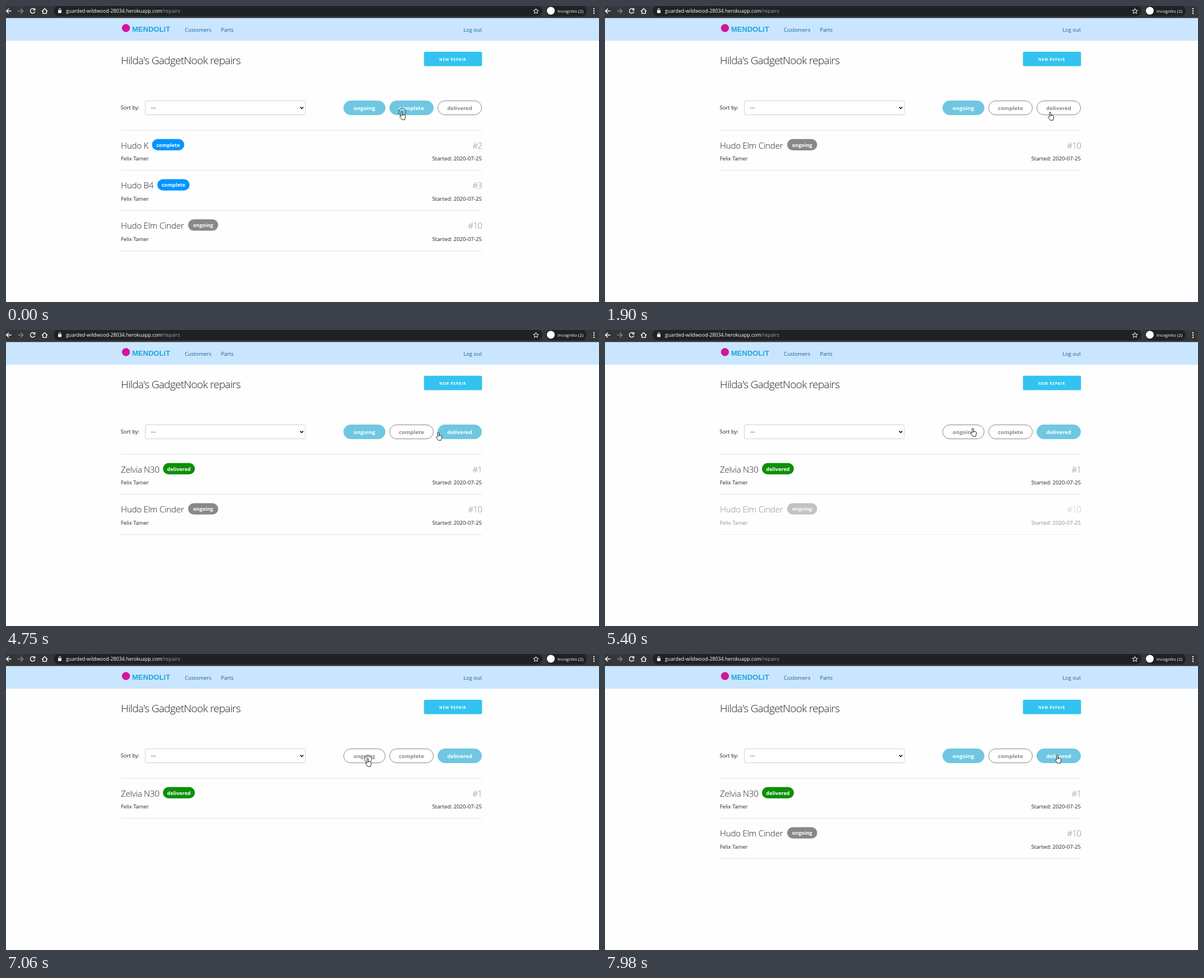
These frames come from a looping animation (1058x529 px, 8000 ms). An HTML page:

```html
<!DOCTYPE html>
<html lang="en">
<head>
<meta charset="utf-8">
<title>Repairs</title>
<style>
html, body { margin: 0; width: 100%; height: 100%; overflow: hidden; background: #fefefe; }
svg { display: block; width: 1058px; height: 529px; font: 9.4px "Open Sans", "Noto Sans", sans-serif; fill: #222; }
.icons { fill: none; stroke: #fff; stroke-width: 1.4; }
.icons .thin { stroke-width: 1; }
.icons .off { stroke: #85878a; }
.link { fill: #1b5e91; }
.name { font-size: 15.3px; font-weight: 300; letter-spacing: -.3px; }
.id { font-size: 15.3px; font-weight: 300; letter-spacing: -.9px; fill: #888; }
.date { font-size: 9.7px; }
.end { text-anchor: end; }
.pill, .badge { font-weight: 700; text-anchor: middle; }
.pill { font-size: 9.6px; }
.badge { font-size: 9px; fill: #fff; }
</style>
</head>
<body>
<svg viewBox="0 0 1058 529">
  <rect width="1058" height="529" fill="#fefefe"/>

  <!-- browser bar -->
  <rect width="1058" height="22" fill="#35363a"/>
  <rect x="85" y="-1" width="872" height="19.5" rx="9.7" fill="#202124"/>
  <rect x="964" y="-1" width="72" height="19.5" rx="9.7" fill="#202124"/>
  <g class="icons">
    <path d="M9.5 9H.8M5 4.8L.8 9L5 13.2"/>
    <path class="off" d="M21.5 9H30.5M26.3 4.8L30.5 9L26.3 13.2"/>
    <path d="M51 6.2A4.2 4.2 0 1 0 51.6 10M51.6 4V7.4H48.2"/>
    <path d="M64 9.6L69 4.8L74 9.6M65.8 8.5V13.4H72.2V8.5"/>
    <path class="thin" d="M94.2 8V6.4a1.8 1.8 0 0 1 3.6 0V8"/>
    <path class="thin" d="M945.5 4.4l1.3 3.1 3.4.3-2.6 2.2.8 3.3-2.9-1.8-2.9 1.8.8-3.3-2.6-2.2 3.4-.3z"/>
  </g>
  <g fill="#fff">
    <rect x="93" y="7.5" width="6" height="5" rx=".6"/>
    <circle cx="972" cy="8.5" r="7"/>
    <circle cx="1049" cy="5" r="1.2"/>
    <circle cx="1049" cy="9" r="1.2"/>
    <circle cx="1049" cy="13" r="1.2"/>
    <text x="107" y="12" font-size="8.8" font-weight="500">guarded-wildwood-28034.herokuapp.com<tspan fill="#9aa0a6" font-weight="400">/repairs</tspan></text>
    <text x="984" y="11.5" font-size="8" font-weight="500">Incognito (2)</text>
  </g>

  <!-- page header -->
  <rect y="21.5" width="1058" height="40.5" fill="#c9e6fe"/>
  <circle cx="214" cy="39.5" r="7.2" fill="#d3149b"/>
  <text x="225" y="46" fill="#1fa5dc" style="font:700 13px 'Liberation Sans',sans-serif">MENDOLiT</text>
  <text x="319" y="45.5" class="link">Customers</text>
  <text x="383.5" y="45.5" class="link">Parts</text>
  <text x="849" y="45.5" class="link end">Log out</text>

  <text x="205" y="103.5" font-size="19" font-weight="300" letter-spacing="-.7">Hilda's GadgetNook repairs</text>
  <rect x="745.7" y="81.8" width="103.6" height="25.8" rx="2.5" fill="#33c3f0"/>
  <text x="773" y="97.7" fill="#fff" font-size="6.6" font-weight="700" letter-spacing=".8">NEW REPAIR</text>

  <text x="204.5" y="185" font-size="9.5">Sort by:</text>
  <rect x="248.5" y="169.5" width="285.5" height="25" rx="2.5" fill="#fff" stroke="#d1d1d1"/>
  <text x="258.5" y="185.3">---</text>
  <path d="M524.8 180.6l2.8 2.8 2.8-2.8" fill="none" stroke="#111" stroke-width="1.5"/>

  <g id="scene"></g>
</svg>
<script>
const LOOP = 8000, TOP = 222, ROW = 71.8;
const scene = document.getElementById('scene');

const statuses = {
  ongoing: { x: 602, width: 75, color: '#888', badge: 53.5 },
  complete: { x: 684, width: 79, color: '#0095ff', badge: 57.5 },
  delivered: { x: 770, width: 79, color: '#0c8f07', badge: 57 }
};
const repairs = [
  { id: 1, name: 'Zelvia N30', status: 'delivered', badgeX: 280 },
  { id: 2, name: 'Hudo K', status: 'complete', badgeX: 260.5 },
  { id: 3, name: 'Hudo B4', status: 'complete', badgeX: 270 },
  { id: 10, name: 'Hudo Elm Cinder', status: 'ongoing', badgeX: 325 }
];

// each click toggles one filter
const clicks = [
  { time: 150, status: 'complete' }, { time: 2520, status: 'delivered' },
  { time: 5280, status: 'ongoing' }, { time: 7180, status: 'ongoing' }
];
// pointer glides: start time, number of steps, destination
const glides = [
  [810, 4, 801, 191], [1900, 2, 779, 187], [2140, 1, 787, 184], [4750, 1, 767, 182],
  [4890, 2, 652, 175], [6070, 2, 726, 188], [6620, 3, 641, 186], [7440, 5, 803, 180]
];

const ease = k => k < .5 ? 8 * k ** 4 : 1 - 8 * (1 - k) ** 4;
const text = (x, y, cls, s, extra = '') => `<text x="${x}" y="${y}" class="${cls}" ${extra}>${s}</text>`;
const rule = y => `<path d="M205 ${y}H849" stroke="#e1e1e1"/>`;

function pointer(t) {
  let x = 702, y = 188;
  for (const [start, steps, toX, toY] of glides) {
    if (t < start) break;
    const k = ease(Math.min(1, (Math.floor((t - start) / 125) + 1) / steps));
    x += (toX - x) * k;
    y += (toY - y) * k;
  }
  const pressed = clicks.some(c => t >= c.time - 150 && t < c.time);
  return `<g transform="translate(${x} ${y})" stroke="#222">` +
    (pressed ? '<circle cx="5" cy="1.5" r="6.5" fill="none" stroke="#345"/>' : '') +
    `<path d="M3 9V1.9a1.2 1.2 0 0 1 2.4 0V6l3.9.9q1.5.4 1.4 2l-.4 3-1 3.3H4.4L.9 10.3
      Q.2 8.9 1.4 8.5Q2.3 8.3 3 9.4M5.4 6V8" fill="#fff" stroke-linejoin="round"/></g>`;
}

function pill(label, on) {
  const { x, width } = statuses[label];
  const paint = on ? 'fill="#6fc7e1" stroke="#6fc7e1"' : 'fill="#fff" stroke="#888"';
  return `<rect x="${x + .5}" y="169.5" width="${width - 1}" height="25" rx="12.5" ${paint}/>` +
    text(x + width / 2, 185.7, 'pill', label, `fill="${on ? '#fff' : '#888'}"`);
}

function row({ id, name, status, badgeX }, y, opacity) {
  const { color, badge } = statuses[status];
  return `<g opacity="${opacity}">` +
    text(205, y + 32.5, 'name', name) +
    `<rect x="${badgeX}" y="${y + 15.7}" width="${badge}" height="20.3" rx="10.1" fill="${color}"/>` +
    text(badgeX + badge / 2, y + 29.5, 'badge', status) +
    text(849, y + 32.5, 'id end', '#' + id) +
    text(205, y + 54, '', 'Felix Tamer') +
    text(849, y + 54, 'date end', 'Started: 2020-07-25') +
    rule(Math.round(y + ROW - .5) + .5) + '</g>';
}

function list(active, click, since) {
  const tick = Math.floor(since / 120);
  let y = TOP, out = rule(TOP);
  for (const r of repairs) {
    const on = active.has(r.status);
    // the bottom row slides up when it enters and fades when it leaves
    const changed = r === repairs.at(-1) && click?.status === r.status;
    const opacity = on ? 1 : changed ? Math.max(0, 1 - (tick + 1) / 4) : 0;
    if (!opacity) continue;
    out += row(r, y + (on && changed ? 27 * .3 ** tick : 0), opacity);
    y += ROW;
  }
  return out;
}

function draw(t) {
  const past = clicks.filter(c => c.time <= t), click = past.at(-1);
  const active = new Set(['ongoing', 'complete']);
  for (const { status } of past) active.delete(status) || active.add(status);
  return Object.keys(statuses).map(s => pill(s, active.has(s))).join('') +
    list(active, click, t - click?.time) + pointer(t);
}

let previous;
const start = performance.now();
function frame(now) {
  const markup = draw(Math.max(0, now - start) % LOOP);
  if (markup !== previous) scene.innerHTML = previous = markup;
  requestAnimationFrame(frame);
}
frame(start);
</script>
</body>
</html>
```
